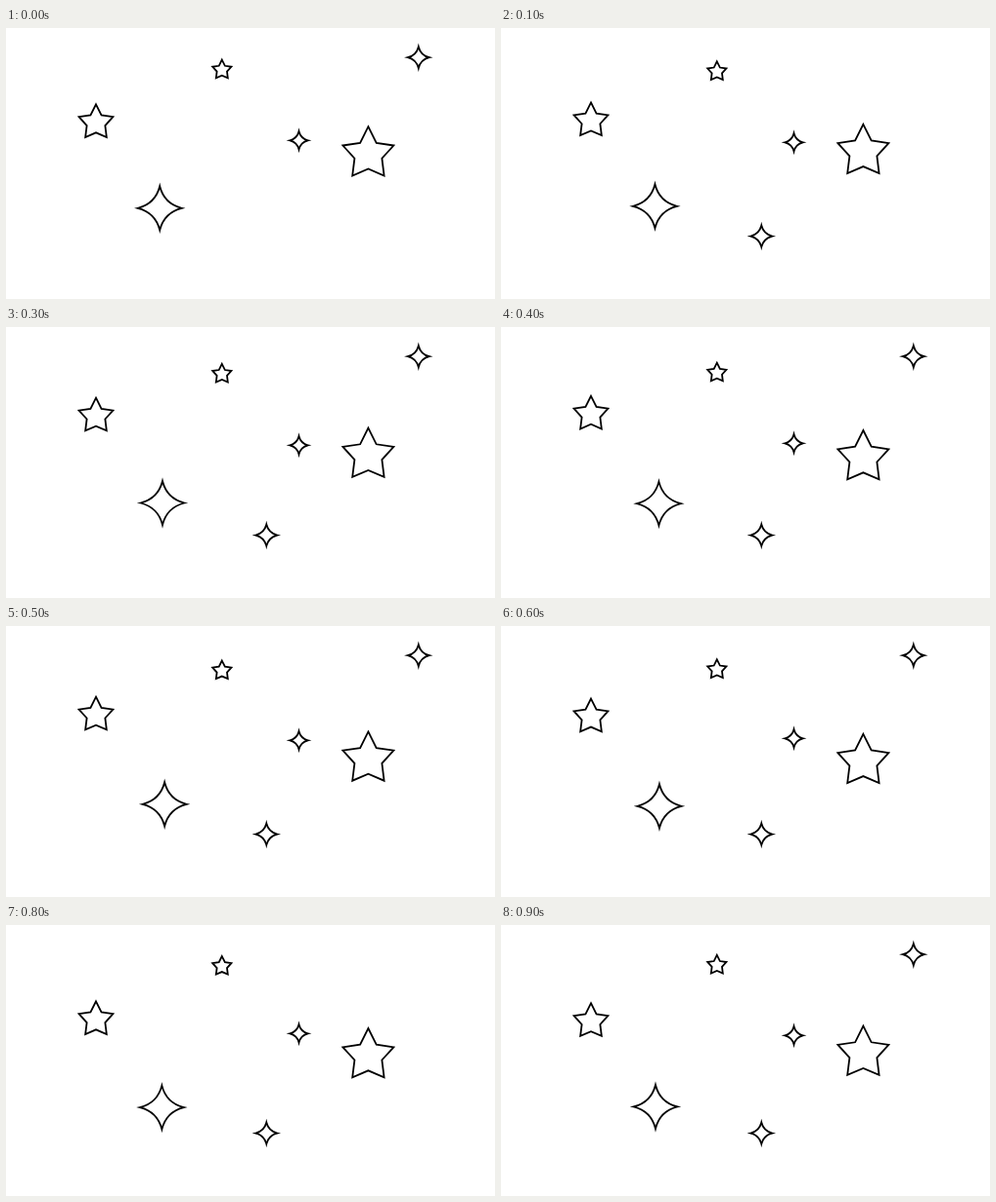
An HTML page that plays this animation: 500 px wide and 278 px high, repeating every 1000 ms.

```html
<!DOCTYPE html>
<html lang="en">
<head>
<meta charset="utf-8">
<title>Twinkling stars</title>
<style>
  html, body { margin: 0; width: 100%; height: 100%; overflow: hidden; background: #fff; }
  svg { display: block; width: 100%; height: 100%; }
  path { fill: none; stroke: #000; stroke-width: 1.8; stroke-miterlimit: 10; vector-effect: non-scaling-stroke; }
</style>
</head>
<body>
<svg id="sky" viewBox="0 0 500 278"></svg>
<script>
const STEPS = 10, STEP_MS = 100;
const STAR = 'M0-26.3L8.3-9.6 26-7 14 6.2 16.2 24 0 17-16.2 24-14 6.2-26-7-8.3-9.6Z';
const SPARKLE = 'M0-22.5Q4.5-4.5 22.5 0Q4.5 4.5 0 22.5Q-4.5 4.5-22.5 0Q-4.5-4.5 0-22.5Z';

// 0 at step `low`, climbing to 1 over `rise` steps, then back down
const swing = (k, low, rise = STEPS / 2) => {
  const p = (k - low + STEPS) % STEPS;
  return p < rise ? p / rise : (STEPS - p) / (STEPS - rise);
};
// smooth wave, -1 at step `low`
const wave = (k, low) => -Math.cos((k - low) / STEPS * 2 * Math.PI);
const fixed = (v) => () => v;

const items = [
  { d: STAR, size: 0.67, x: fixed(92), y: k => 88.4 + 9.4 * swing(k, 4) },
  { d: STAR, size: 0.37, x: fixed(220.8), y: k => 40.6 + 7 * swing(k, 9, 4) },
  { d: STAR, size: 1, x: fixed(370.4), y: k => 125.1 + 12 * swing(k, 1) },
  { d: SPARKLE, size: 1, x: k => 159.7 + 2.5 * wave(k, 0.3), y: k => 183.8 + 3.3 * wave(k, 3) },
  { d: SPARKLE, size: 0.41, x: fixed(299.5), y: k => 111.3 + 10 * swing(k, 8) },
  { d: SPARKLE, size: 0.49, x: fixed(421.8), y: fixed(30.2), off: [1, 8] },
  { d: SPARKLE, size: 0.49, x: fixed(266.3), y: fixed(213.6), off: [0, 2] }
];

const sky = document.getElementById('sky');
for (const item of items) {
  item.el = document.createElementNS('http://www.w3.org/2000/svg', 'path');
  item.el.setAttribute('d', item.d);
  sky.appendChild(item.el);
}

function draw(ms) {
  const k = Math.floor(ms / STEP_MS) % STEPS;
  for (const { el, size, x, y, off = [] } of items) {
    el.setAttribute('transform', `translate(${x(k)} ${y(k)}) scale(${size})`);
    el.setAttribute('visibility', off.includes(k) ? 'hidden' : 'visible');
  }
}

const start = performance.now();
function tick() {
  draw(performance.now() - start);
  requestAnimationFrame(tick);
}
tick();
</script>
</body>
</html>
```
